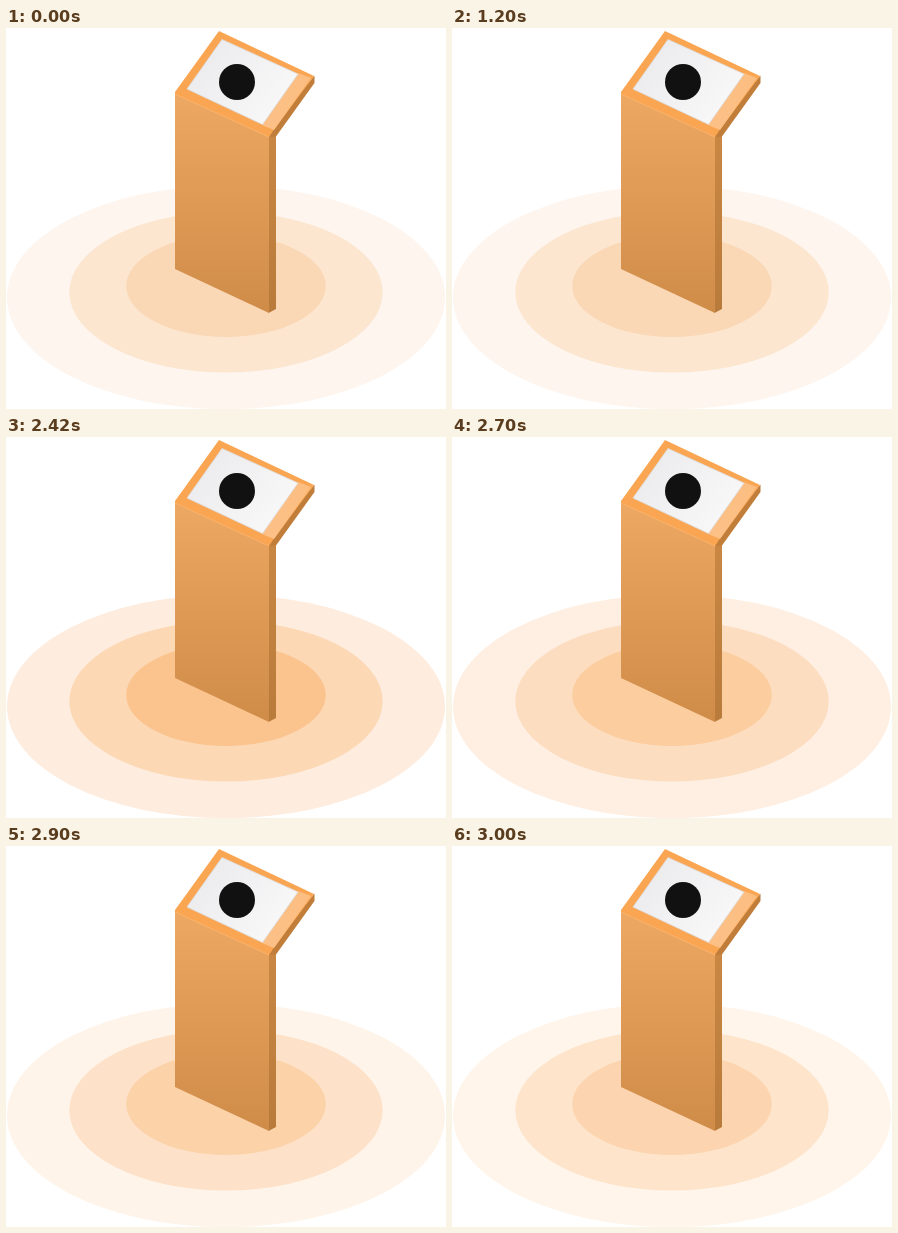
Write an HTML page that moves like this. It is 440x381 px and loops after 3200 ms.

```html
<!DOCTYPE html>
<html lang="en">
<head>
<meta charset="utf-8">
<title>Kiosk with pulsing rings</title>
<style>
  html, body { margin: 0; width: 100%; height: 100%; overflow: hidden; background: #fff; }
  svg { display: block; width: 440px; height: 381px; }
</style>
</head>
<body>
<svg viewBox="0 0 440 381">
  <defs>
    <linearGradient id="front" x1="0" y1="0" x2="0" y2="1">
      <stop offset="0" stop-color="#eda863"/>
      <stop offset="1" stop-color="#cf8c48"/>
    </linearGradient>
    <linearGradient id="side" x1="0" y1="0" x2="0" y2="1">
      <stop offset="0" stop-color="#c98743"/>
      <stop offset="1" stop-color="#b97b3b"/>
    </linearGradient>
    <linearGradient id="strip" x1="1" y1="0" x2="0" y2="1">
      <stop offset="0" stop-color="#fcbd80"/>
      <stop offset="1" stop-color="#fcc188"/>
    </linearGradient>
    <linearGradient id="screen" x1="0" y1="0" x2="1" y2=".6">
      <stop offset="0" stop-color="#e9e9eb"/>
      <stop offset="1" stop-color="#f8f8f9"/>
    </linearGradient>
  </defs>

  <ellipse class="ring" cx="220" cy="269.4" rx="219" ry="111.8"/>
  <ellipse class="ring" cx="220" cy="264.2" rx="156.700" ry="80.4"/>
  <ellipse class="ring" cx="220" cy="258" rx="99.800" ry="51"/>

  <path fill="url(#side)" d="M262.5 106L270 103V281L262.5 285Z"/>
  <path fill="url(#front)" d="M169 65L263 108V285L169 241Z"/>

  <path fill="#c17d3a" d="M308.500 47.500V55L270 108.500L263 109V103Z"/>
  <path fill="#faa552" d="M213 3L308 48L267 103L263 109L169 66V64Z"/>
  <path fill="none" stroke="#fbb672" stroke-width=".8" d="M169 66L263 109"/>
  <path fill="url(#strip)" d="M292 45L305 50L268 102L256 97Z"/>
  <path fill="url(#screen)" stroke="#dcdcde" stroke-width=".8" d="M216 11.500L292 46L256.500 96.500L181 61Z"/>
  <circle cx="231" cy="54" r="18" fill="#111"/>
</svg>
<script>
  const LOOP = 3200;
  // start time, then outer, middle and inner ring colours
  const steps = [
    [0, '#fef5ee', '#fce6d0', '#fad8b6'],
    [2000, '#feecde', '#fcd8b5', '#fbc48f'],
    [2700, '#feefe2', '#fdddbf', '#fccd9f'],
    [2900, '#fff4e9', '#fde1c8', '#fcd2a9'],
    [3000, '#fff5ea', '#fde4cb', '#fcd5b0']
  ];
  const rings = document.querySelectorAll('.ring');

  function draw(now) {
    const t = now % LOOP;
    const [, ...colors] = steps.filter(([start]) => start <= t).pop();
    rings.forEach((ring, i) => ring.setAttribute('fill', colors[i]));
  }

  function tick() {
    draw(performance.now());
    requestAnimationFrame(tick);
  }
  tick();
</script>
</body>
</html>
```
